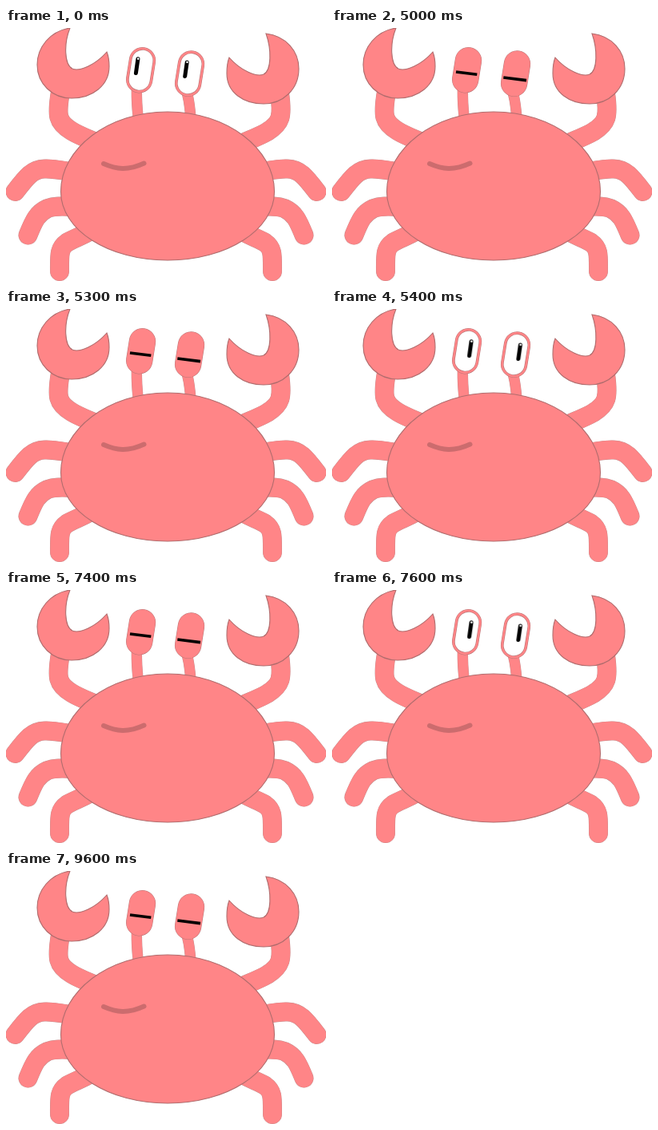
An HTML page that plays this animation: 400 px wide and 317 px high, repeating every 9.8 s.

```html
<!DOCTYPE html>
<html lang="en">
<head>
<meta charset="utf-8">
<title>Blinking crab</title>
<style>
  html, body { margin: 0; width: 100%; height: 100%; overflow: hidden; background: #fff; }
  svg { display: block; width: 400px; height: 317px; }
  path { fill: none; stroke-linecap: round; }
  .rim { stroke: #c58a8a; }
  .skin { stroke: #ff8587; }
  .limb.rim { stroke-width: 24px; }
  .limb.skin { stroke-width: 23.2px; }
  .stalk.rim { stroke-width: 13.4px; }
  .stalk.skin { stroke-width: 12.6px; }
  .shell { fill: #ff8587; stroke: #b06c6d; stroke-width: 1.1px; }
  .mouth { stroke: #cc6c6e; stroke-width: 6px; }
  .ball.rim { stroke: #b87475; stroke-width: 33.4px; }
  .ball.skin { stroke-width: 32.4px; }
  .white.rim { stroke: #b87475; stroke-width: 27.2px; }
  .white.fill { stroke: #fff; stroke-width: 26px; }
  .pupil { stroke: #000; stroke-width: 5px; }
  .lid { stroke: #000; stroke-width: 3.6px; stroke-linecap: butt; }

  .open { animation: open 9.8s step-end infinite; }
  .closed { animation: closed 9.8s step-end infinite; }
  .gaze { animation: gaze 9.8s step-end infinite; }
  @keyframes open {
    0%, 52.0408%, 55.102%, 77.551% { opacity: 1; }
    51.0204%, 54.0816%, 75.5102%, 97.9592%, 100% { opacity: 0; }
  }
  @keyframes closed {
    0%, 52.0408%, 55.102%, 77.551% { opacity: 0; }
    51.0204%, 54.0816%, 75.5102%, 97.9592%, 100% { opacity: 1; }
  }
  @keyframes gaze {
    0% { transform: translate(0, 0); }
    54.0816%, 100% { transform: translate(9.2px, 2px); }
  }
</style>
</head>
<body>
<svg viewBox="0 0 400 317">
  <defs>
    <g id="legs">
      <path d="M11.5 205C26 186 33 177 48 176.5C58 176 68 178 80 180"/>
      <path d="M27.5 259.5C35 241 39 232 52 226C60 223 68 223 82 224"/>
      <path d="M67 305C67 285 66 276 76 269C84 264 92 262 106 254"/>
    </g>
    <g id="limbs">
      <path d="M68 80C63 110 64 118 82 129C90 134 98 137 112 143"/>
      <path d="M342 82C346 111 344 119 326.5 130C318 135 310 138 296 144"/>
      <use href="#legs"/>
      <use href="#legs" transform="matrix(-1 0 0 1 400 0)"/>
    </g>
    <path id="stalks" d="M163.3 76C163.3 92 163.6 98 165 110M225 78C228 85 229.5 96 230.7 110"/>
    <path id="eyes" d="M170.5 40.7L166.7 64.7M231.5 45L227.6 69.3"/>
  </defs>

  <use href="#limbs" class="limb rim"/>
  <use href="#limbs" class="limb skin"/>
  <use href="#stalks" class="stalk rim"/>
  <use href="#stalks" class="stalk skin"/>

  <g class="shell">
    <path style="fill:inherit" d="M80 0C55 4 39 24 39 46C39 70 58 88 82 88C108 88 129 72 129 48C129 41 128 35 126 30C112 46 92 55 83 51C73 46 72 20 80 0Z"/>
    <path style="fill:inherit" d="M325 7C350 10 366 29 366 51C366 77 346 95 322 95C297 95 276 81 276 57C276 49 277 42 279 37C293 53 313 62 322 58C332 53 332 27 325 7Z"/>
    <path style="fill:inherit" d="M68.5 205C68.5 151 128 105 202 105C276 105 335.5 151 335.5 205C335.5 253 276 291 202 291C128 291 68.5 253 68.5 205Z"/>
  </g>
  <path class="mouth" d="M122 170C138 177 152 179 172.5 169.5"/>

  <use href="#eyes" class="ball rim"/>
  <use href="#eyes" class="ball skin"/>
  <g class="open">
    <use href="#eyes" class="white rim"/>
    <use href="#eyes" class="white fill"/>
    <g class="gaze">
      <path class="pupil" d="M164.9 38.8L162.4 56.5M226.2 43L223.7 60.5"/>
      <g fill="#fff">
        <circle cx="165.2" cy="38.6" r="1.3"/>
        <circle cx="226.5" cy="42.8" r="1.3"/>
      </g>
    </g>
  </g>
  <path class="lid closed" d="M155 55L181.3 58.3M214.3 62L243 65.6"/>
</svg>
</body>
</html>
```
